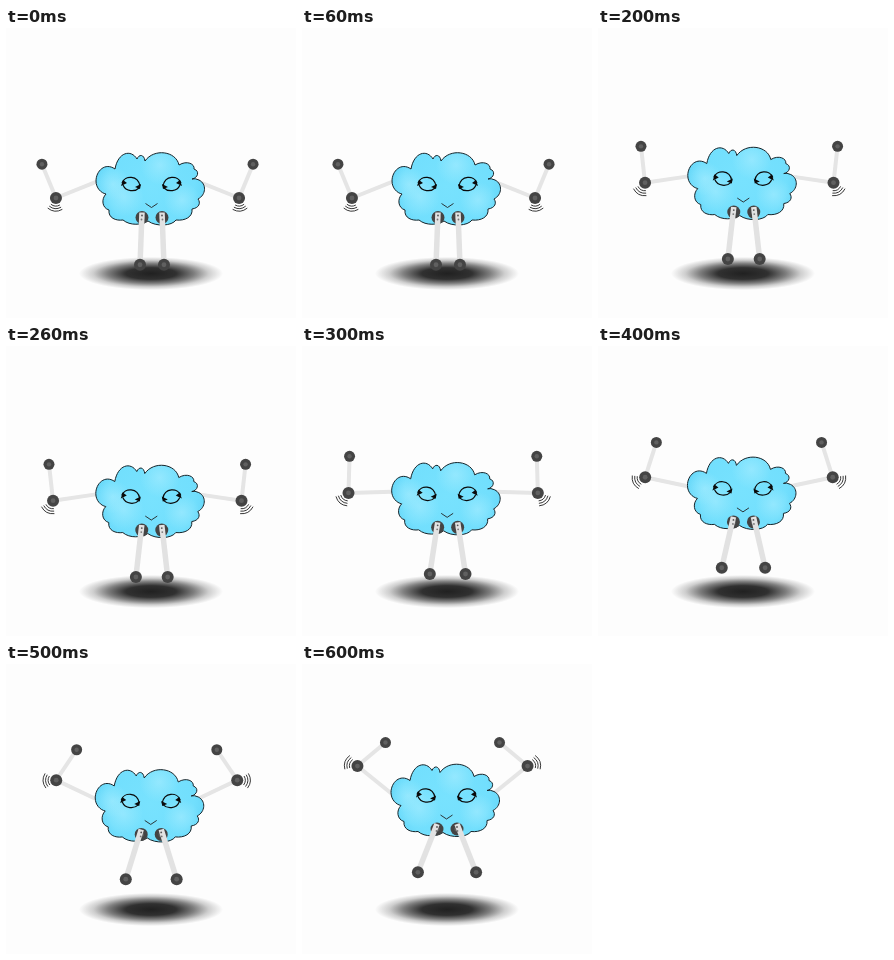
Recreate the animation shown at these times as an HTML page with a canvas. Size 290 by 290 pixels, loop 700 ms.

```html
<!DOCTYPE html>
<html>
<head>
<meta charset="utf-8">
<style>
html, body { margin: 0; width: 100%; height: 100%; overflow: hidden; background: #fdfdfd; }
canvas { display: block; }
</style>
</head>
<body>
<canvas id="stage" width="290" height="290"></canvas>
<script>
const g = document.getElementById('stage').getContext('2d');
const STEP = 100, STEPS = 7;
const mix = (a, b, u) => a + (b - a) * u;
const rad = degrees => degrees * Math.PI / 180;

const cloud = new Path2D(`M109 141 C99 134 90 143 90 153 C90 160 95 165 100 166
  C95 171 96 180 103 182 C102 190 110 193 117 192 C124 198 136 197 142 193
  C150 199 166 198 170 192 C179 193 187 189 186 181 C193 180 195 175 192 171
  C200 167 201 156 193 152 Q189 150 186 151 C192 150 194 143 188 141
  C189 136 181 132 173 137 C170 123 148 120 139 133 C138 126 133 126 131 131
  C125 121 112 124 109 141 Z`);
const eye = new Path2D('M-9 -1 C-6 -9 7 -9 9 2 M8 4 C4 8 -5 8 -8 1');
const lashes = new Path2D('M-10 2 L-8 -4 L-4 -1 Z M10 0 L9 5 L4 3 Z');

function line(x1, y1, x2, y2, width, color) {
  g.beginPath();
  g.moveTo(x1, y1);
  g.lineTo(x2, y2);
  g.lineWidth = width;
  g.strokeStyle = color;
  g.stroke();
}

function disc(x, y, r, color) {
  g.beginPath();
  g.arc(x, y, r, 0, 7);
  g.fillStyle = color;
  g.fill();
}

function joint(x, y, r) {
  disc(x, y, r, '#444');
  disc(x, y, r * 0.4, '#606060');
}

function glow(x, y, r, stops) {
  const fill = g.createRadialGradient(x, y, 0, x, y, r);
  stops.forEach(([at, color]) => fill.addColorStop(at, color));
  g.fillStyle = fill;
}

function at(x, y, sx, sy, paint) {
  g.save();
  g.translate(x, y);
  g.scale(sx, sy);
  paint();
  g.restore();
}

function mirrored(x, y, paint) {
  for (const side of [1, -1]) at(x, y, side, 1, paint);
}

function shadow() {
  at(145, 245.5, 1, 0.23, () => {
    glow(0, 0, 72, [[0, '#111e'], [0.35, '#111d'], [0.6, '#1118'], [0.8, '#1113'], [1, '#1110']]);
    g.fillRect(-72, -72, 144, 144);
  });
}

// Left arm; x = 0 is the mirror axis, u is the progress of the jump
function arm(u) {
  const upper = rad(mix(22, -39, u));
  const fore = rad(mix(-22.5, 50, u));
  const swish = rad(mix(95, 200, u));
  const ex = -51.4 - 43.3 * Math.cos(upper), ey = 153.8 + 43.3 * Math.sin(upper);
  const hx = ex + 36.6 * Math.sin(fore), hy = ey - 36.6 * Math.cos(fore);
  line(-46, 153.8, -51.4, 153.8, 4, '#e5e5e5');
  line(-51.4, 153.8, ex, ey, 4, '#e5e5e5');
  line(ex, ey, hx, hy, 4, '#e5e5e5');
  joint(ex, ey, 6);
  joint(hx, hy, 5.5);
  g.strokeStyle = '#222';
  g.lineWidth = 0.9;
  for (const r of [8, 10.5, 13]) {
    g.beginPath();
    g.arc(ex, ey, r, swish - 0.6, swish + 0.6);
    g.stroke();
  }
}

function body() {
  glow(145, 158, 62, [[0, '#78e2fe'], [0.7, '#72dffd'], [1, '#62d4f7']]);
  g.fill(cloud);
  for (const [x, y, r] of [[107, 156, 17], [118, 169, 20], [154, 137, 20], [176, 172, 18]]) {
    glow(x, y, r, [[0, '#a8edff99'], [1, '#a8edff00']]);
    g.fill(cloud);
  }
  g.strokeStyle = '#16242a';
  g.lineWidth = 1;
  g.stroke(cloud);
  mirrored(145.5, 0, () => at(-20.5, 156, 1, 1, () => {
    g.strokeStyle = g.fillStyle = '#0a0a0a';
    g.lineWidth = 1.2;
    g.stroke(eye);
    g.fill(lashes);
  }));
  mirrored(145.5, 0, () => line(-6, 175.5, 0, 179.5, 0.9, '#222'));
}

// Left leg; x = 0 is the axis between the legs
function leg(u) {
  const swing = rad(mix(2.4, 23.8, u));
  const fx = -10 - 47.3 * Math.sin(swing), fy = 189.5 + 47.3 * Math.cos(swing);
  joint(-10, 189.5, 6.5);
  line(-10, 184.5, fx, fy, 5.5, '#e2e2e2');
  disc(-10, 187.5, 0.9, '#555');
  disc(-10.5, 191.5, 0.9, '#777');
  joint(fx, fy, 6);
}

function draw(now) {
  const k = Math.floor(now / STEP) % STEPS;
  // A slow first half, then twice the speed
  const u = Math.max(k, 2 * k - 3) / 9;
  const axis = 141.5 - u, lift = -24.5 * u;
  g.fillStyle = '#fdfdfd';
  g.fillRect(0, 0, 290, 290);
  shadow();
  mirrored(axis, lift, () => arm(u));
  at(-u, lift, 1, 1, body);
  mirrored(axis + 4.5, lift, () => leg(u));
}

const start = performance.now();
function tick() {
  draw(performance.now() - start);
  requestAnimationFrame(tick);
}
tick();
</script>
</body>
</html>
```
